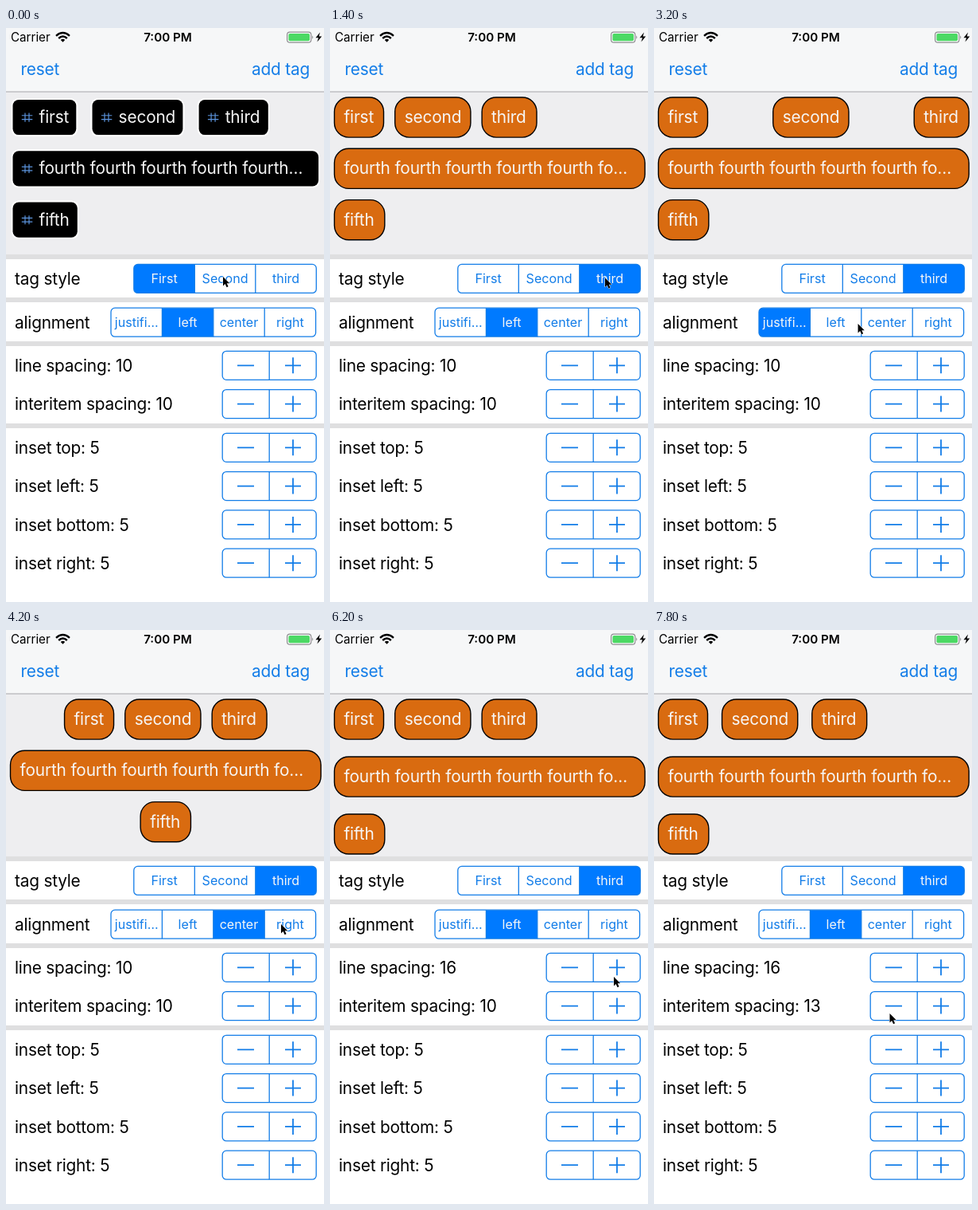
An HTML page that plays this animation: 400x720 px, repeating every 8 s.

```html
<!DOCTYPE html>
<html lang="en">
<head>
<meta charset="utf-8">
<title>Tag layout demo</title>
<style>
  html, body { margin: 0; width: 100%; height: 100%; overflow: hidden; background: #fff; }
  svg { display: block; width: 100%; height: 100%; font-family: Inter, Roboto, sans-serif; }
  text { white-space: pre; }
  .label { font-size: 20.8px; letter-spacing: -.2px; }
  .tag { font-size: 20.8px; letter-spacing: -.15px; fill: #f6f6f6; }
  .seg { font-size: 16.1px; text-anchor: middle; }
  .status { font-size: 15.2px; }
  .line { fill: none; stroke: #137de8; stroke-width: 1.3; }
  .link { fill: #137de8; }
  .selected { fill: #007aff; }
</style>
</head>
<body>
<svg viewBox="0 0 400 720">
  <defs><clipPath id="area"><rect y="80" width="400" height="204"/></clipPath></defs>
  <rect width="400" height="720" fill="#fff"/>
  <rect width="400" height="80" fill="#f6f7f8"/>
  <rect y="80" width="400" height="204" fill="#eeeef0"/>
  <rect y="79.4" width="400" height="1.2" fill="#b3b3b6"/>
  <text class="status" x="6" y="17">Carrier</text>
  <g fill="none" stroke="#000" stroke-width="2.4">
    <path d="M63 9.8Q71.5 2.2 80 9.8M66.2 13Q71.5 8.2 76.8 13"/>
    <path d="M71.5 17.8L68.8 15Q71.5 12.6 74.2 15Z" fill="#000" stroke="none"/>
  </g>
  <text class="status" x="203.5" y="17" font-weight="600" text-anchor="middle">7:00 PM</text>
  <rect x="353.6" y="5.1" width="30.2" height="13" rx="3.4" fill="none" stroke="#8e8e90" stroke-width="1.2"/>
  <rect x="355.4" y="6.9" width="26.6" height="9.4" rx="1.8" fill="#4cd964"/>
  <path d="M385.2 9.4Q387.4 11.6 385.2 13.8Z" fill="#8e8e90"/>
  <path d="M395 5.5L389.5 12.3H393L391.4 17.6L397.2 10.6H393.6Z"/>
  <text class="label link" x="18.5" y="59.3">reset</text>
  <text class="label link" x="309" y="59.3">add tag</text>
  <g id="tags" clip-path="url(#area)"></g>
  <g id="controls"></g>
  <path id="cursor" d="M0 0V11.4L2.6 9L4.6 13.2L6.6 12.3L4.7 8.2H8.2Z" stroke="#fff" stroke-width="1" paint-order="stroke"/>
</svg>
<script>
const LOOP = 8000, STEP = 200, PT = 1.28;
const LEFT = 4.8, WIDTH = 392, TOP = 86.3;
const $ = id => document.getElementById(id);

const words = ['first', 'second', 'third', 'fourth', 'fifth'];
const fourths = n => Array(n).fill('fourth').join(' ');
const styles = [
  { widths: [87.2, 121.3, 94.6, WIDTH, 88.7], height: 51.5, long: fourths(5) + '…', draw: drawHash },
  { widths: [109, 143, 116, WIDTH, 111], height: 77, long: fourths(4) + '…', draw: drawTeal },
  { widths: [63.4, 96.6, 70.3, WIDTH, 64.7], height: 51.5, long: fourths(5) + ' fo…', draw: drawOrange }
];

// Each track lists [start time, value].
const tracks = {
  style: [[0, 0], [200, 1], [1000, 2]],
  align: [[0, 1], [2600, 0], [3400, 2], [4400, 3], [5000, 1]],
  line: [[0, 10], [5600, 12], [5800, 13], [6000, 15], [6200, 16]],
  item: [[0, 10], [6800, 11], [7000, 13], [7200, 15], [7600, 14], [7800, 13]]
};
const cursorPath = [
  [0, 273, 312], [400, 275, 312], [800, 332, 308], [1000, 346, 312], [1600, 346, 314],
  [2400, 161, 370], [2800, 161, 371], [3400, 290, 371], [3800, 292, 371], [4200, 346, 369],
  [4600, 346, 370], [5000, 230, 371], [5400, 360, 437], [6200, 357, 435],
  [6600, 360, 481], [7200, 359, 482], [7600, 297, 481], [8000, 296, 481]
];

const held = (track, t) => track.filter(([start]) => start <= t).pop()[1];
const text = (cls, x, y, s) => `<text class="${cls}" x="${x}" y="${y}">${s}</text>`;
const box = (x, y, w, h, r, attrs = '') => `<rect x="${x}" y="${y}" width="${w}" height="${h}" rx="${r}" ${attrs}/>`;

function drawHash(x, y, w, h, s) {
  const mid = y + h / 2;
  return box(x + 1.6, y + 1.6, w - 3.2, h - 3.2, 9.5, 'fill="#fff"')
    + box(x + 3.7, y + 3.7, w - 7.4, h - 7.4, 7.5)
    + `<path transform="translate(${x + 15} ${mid - 5.5})" d="M0 3.2H13.5M0 8H13.5M4.2 0V11.2M9.2 0V11.2" fill="none" stroke="#5b93dc" stroke-width="1.2"/>`
    + text('tag', x + 36.8, mid + 7, s);
}

function drawTeal(x, y, w, h, s) {
  return box(x + 1.2, y + 1.2, w - 2.4, h - 2.4, 18, 'fill="#1cc8ba" stroke="#fbfb10" stroke-width="2.5"')
    + text('tag', x + 12.7, y + h / 2 + 7, s)
    + `<circle cx="${x + w - 31.5}" cy="${y + h / 2 + 2}" r="17.5" fill="#d96b12"/>`;
}

function drawOrange(x, y, w, h, s) {
  return box(x + .7, y + .7, w - 1.4, h - 1.4, 18, 'fill="#d96b10" stroke="#000" stroke-width="1.4"')
    + text('tag', x + 12.7, y + h / 2 + 7, s);
}

function layoutTags({ style, align, line, item }) {
  const { widths, height, long, draw } = styles[style];
  const gap = item * PT;
  const rows = [];
  let used = Infinity;
  widths.forEach((w, i) => {
    if (used + gap + w > WIDTH) { rows.push([]); used = -gap; }
    rows[rows.length - 1].push(i);
    used += gap + w;
  });
  return rows.map((row, r) => {
    const total = row.reduce((sum, i) => sum + widths[i], 0);
    const spare = WIDTH - total - gap * (row.length - 1);
    const spread = align === 0 && row.length > 1 ? spare / (row.length - 1) : 0;
    let x = LEFT + [0, 0, spare / 2, spare][align];
    const y = TOP + r * (height + line * PT);
    return row.map(i => {
      const tag = draw(x, y, widths[i], height, i === 3 ? long : words[i]);
      x += widths[i] + gap + spread;
      return tag;
    }).join('');
  }).join('');
}

function segments(x, y, w, names, selected) {
  const cell = w / names.length;
  const id = 'clip' + y;
  const cells = names.map((name, i) => {
    const left = x + cell * i;
    const divider = i ? `<path class="line" d="M${left} ${y}v36"/>` : '';
    const color = i === selected ? '#f6f6f6' : '#137de8';
    return divider + `<g fill="${color}">${text('seg', left + cell / 2, y + 23.8, name)}</g>`;
  });
  return `<clipPath id="${id}">${box(x, y, w, 36, 5)}</clipPath>`
    + `<rect class="selected" x="${x + cell * selected}" y="${y}" width="${cell}" height="36" clip-path="url(#${id})"/>`
    + box(x, y, w, 36, 5, 'class="line"') + cells.join('');
}

const stepper = y => box(272.2, y, 118, 36, 5, 'class="line"')
  + `<path class="line" d="M331.2 ${y}v36"/>`
  + `<path class="line" style="stroke-width:1.8" d="M291 ${y + 18}h21M351 ${y + 18}h20M361 ${y + 8}v20"/>`;

function controls({ style, align, line, item }) {
  const bars = [284, 338, 393, 496].map(y => box(0, y, 400, 6, 0, 'fill="#dfdfe0"')).join('');
  const rows = [
    [405.3, 'line spacing: ' + line], [453.6, 'interitem spacing: ' + item],
    ...['top', 'left', 'bottom', 'right'].map((side, i) => [508.3 + i * 48.3, `inset ${side}: 5`])
  ];
  return bars
    + text('label', 11, 321.5, 'tag style') + segments(160.8, 296.4, 229.5, ['First', 'Second', 'third'], style)
    + text('label', 11, 376.5, 'alignment') + segments(132, 351.2, 257.6, ['justifi…', 'left', 'center', 'right'], align)
    + rows.map(([y, s]) => text('label', 11, y + 25.7, s) + stepper(y)).join('');
}

function cursorAt(t) {
  const i = cursorPath.findIndex(p => p[0] > t);
  const [t0, x0, y0] = cursorPath[i - 1], [t1, x1, y1] = cursorPath[i];
  const k = (t - t0) / (t1 - t0), e = k * k * (3 - 2 * k);
  return [x0 + (x1 - x0) * e, y0 + (y1 - y0) * e];
}

let shown = -1;
function render(now) {
  const t = Math.floor((now % LOOP) / STEP) * STEP;
  if (t !== shown) {
    shown = t;
    const state = {};
    for (const key in tracks) state[key] = held(tracks[key], t);
    $('tags').innerHTML = layoutTags(state);
    $('controls').innerHTML = controls(state);
    $('cursor').setAttribute('transform', `translate(${cursorAt(t)})`);
  }
  requestAnimationFrame(() => render(performance.now() - start));
}
const start = performance.now();
render(0);
</script>
</body>
</html>
```
